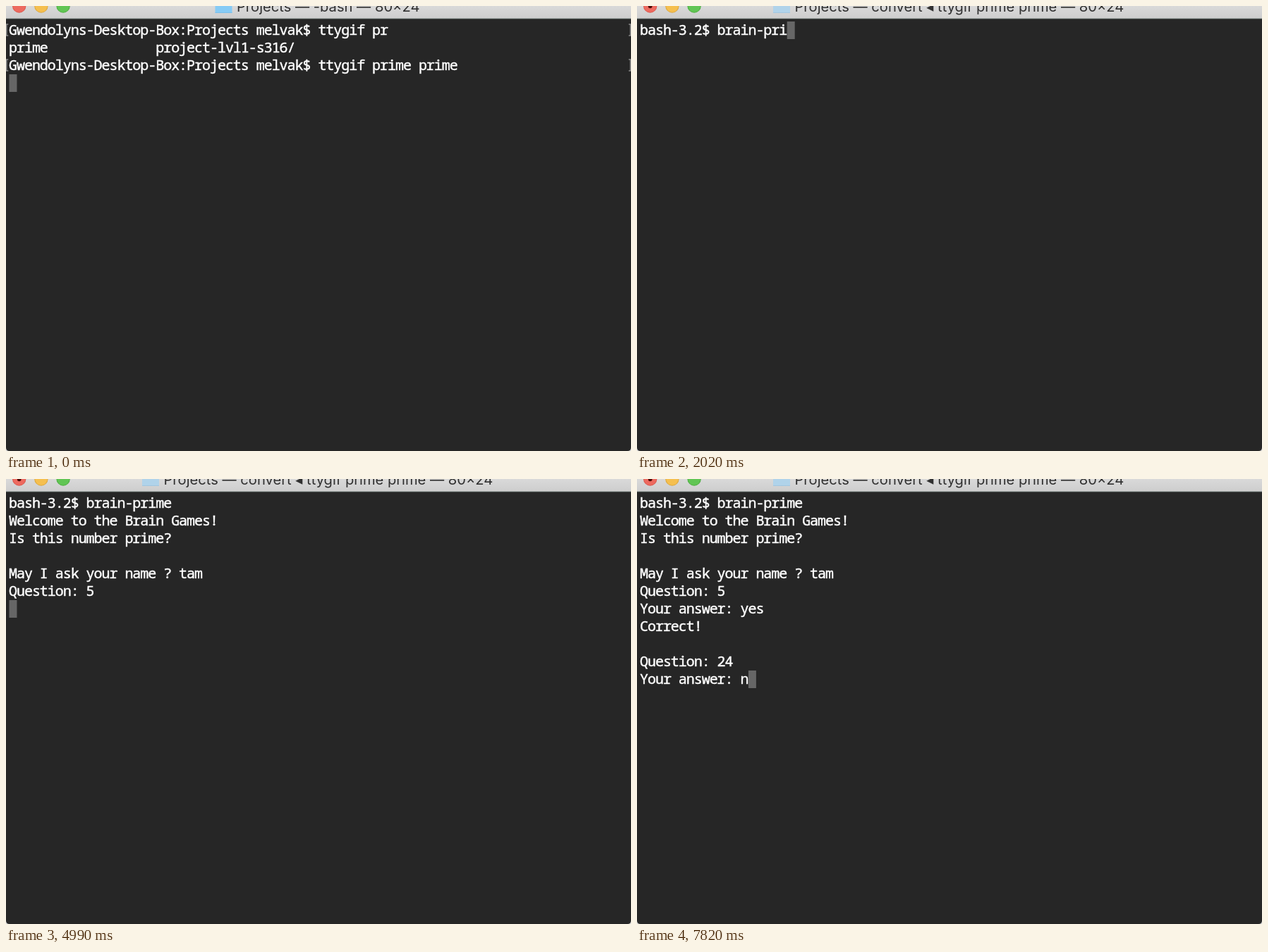
These frames come from a looping animation (886 by 632 pixels, 8 s). An HTML page with a canvas:

```html
<!DOCTYPE html>
<html lang="en">
<head>
<meta charset="utf-8">
<title>Terminal</title>
<style>
html, body { margin: 0; width: 100%; height: 100%; overflow: hidden; background: #262626; }
canvas { display: block; }
</style>
</head>
<body>
<canvas id="stage" width="886" height="632"></canvas>
<script>
const ctx = document.getElementById('stage').getContext('2d');
const W = 886, H = 632, LOOP = 8000;
const LEFT = 4.5, TOP = 22, COL = 10.96, ROW = 25;
const MONO = '400 20px "Noto Sans Mono", "DejaVu Sans Mono", monospace';
const SANS = '400 20.15px Inter, Roboto, sans-serif';
const PROMPT = 'Gwendolyns-Desktop-Box:Projects melvak$ ';
const CLEAR = 660;

const shell = PROMPT + 'ttygif pr\n' + 'prime'.padEnd(19) + 'project-lvl1-s316/\n' +
  PROMPT + 'ttygif prime prime\n';

// Output chunks in order: [time in ms, appended text]
const chunks = [
  [660, 'bash-3.2$ '], [750, 'b'], [840, 'r'], [920, 'a'], [1010, 'i'], [1300, 'n'],
  [1620, '-'], [1740, 'p'], [1870, 'r'], [2020, 'i'], [2680, 'm'], [3020, 'e'],
  [3110, '\n'], [3200, 'Welcome to the Brain Games!\nIs this number prime?\n\n'],
  [4500, 'May I ask your name ? '], [4590, 't'], [4680, 'a'], [4890, 'm'],
  [4990, '\nQuestion: 5\n'],
  [6470, 'Your answer: '], [6560, 'y'], [6650, 'e'],
  [6850, 's\nCorrect!\n\nQuestion: 24\n'],
  [7700, 'Your answer: '], [7820, 'n']
];

function rect(x, y, w, h, color) {
  ctx.fillStyle = color;
  ctx.fillRect(x, y, w, h);
}

function disc(x, y, r, color) {
  ctx.fillStyle = color;
  ctx.beginPath();
  ctx.arc(x, y, r, 0, Math.PI * 2);
  ctx.fill();
}

function titleBar(busy) {
  const bar = ctx.createLinearGradient(0, 0, 0, 17);
  bar.addColorStop(0, '#d9d9d9');
  bar.addColorStop(1, '#cecece');
  rect(0, 0, W, 17, bar);
  rect(0, 17, W, 1, '#a5aaa8');
  rect(0, 18, W, 1, '#454a48');

  const lights = [['#ed6a5f', '#d9594e'], ['#f5bf4f', '#dba63c'], ['#61c554', '#4fae43']];
  lights.forEach(([fill, edge], i) => {
    disc(18.7 + i * 31.2, 0, 9.7, edge);
    disc(18.7 + i * 31.2, 0, 8.8, fill);
  });
  if (busy) disc(18.7, 0.5, 2.8, '#4a0a06');

  const x = busy ? 193 : 296.5;
  rect(x, 0, 24, 10, busy ? '#b0d3ea' : '#86cbf5');
  rect(x, 9, 24, 1, busy ? '#a2c6df' : '#79bfea');
  const name = busy ? 'convert ◂ ttygif prime prime' : '-bash';
  ctx.font = SANS;
  ctx.letterSpacing = '0px';
  ctx.fillStyle = '#303030';
  ctx.fillText(`Projects — ${name} — 80×24`, x + 30.5, 8);
}

function bracket(x, y, dir) {
  ctx.strokeStyle = '#8c8c8c';
  ctx.lineWidth = 1.5;
  ctx.beginPath();
  ctx.moveTo(x + dir * 2.5, y);
  ctx.lineTo(x, y);
  ctx.lineTo(x, y + 16);
  ctx.lineTo(x + dir * 2.5, y + 16);
  ctx.stroke();
}

function terminal(content) {
  const lines = content.split('\n');
  const row = lines.length - 1;
  rect(LEFT + lines[row].length * COL, TOP + row * ROW, COL, ROW, '#666');

  ctx.font = MONO;
  ctx.letterSpacing = '0px';
  ctx.letterSpacing = COL - ctx.measureText('m').width + 'px';
  ctx.fillStyle = ctx.strokeStyle = '#fff';
  ctx.lineWidth = 0.45;
  lines.forEach((line, i) => {
    const y = TOP + 19 + i * ROW;
    ctx.fillText(line, LEFT - 0.5, y);
    ctx.strokeText(line, LEFT - 0.5, y);
  });
}

function corners() {
  const r = 5;
  ctx.fillStyle = '#d8d8d8';
  for (const [x, dir] of [[0, 1], [W, -1]]) {
    ctx.beginPath();
    ctx.moveTo(x, H - r);
    ctx.quadraticCurveTo(x, H, x + dir * r, H);
    ctx.lineTo(x, H);
    ctx.fill();
  }
}

function draw(t) {
  const busy = t >= CLEAR;
  rect(0, 0, W, H, '#262626');
  titleBar(busy);
  if (busy) {
    terminal(chunks.filter(c => c[0] <= t).map(c => c[1]).join(''));
  } else {
    terminal(shell);
    for (const row of [0, 2]) {
      bracket(0.75, TOP + 4 + row * ROW, 1);
      bracket(W - 0.75, TOP + 4 + row * ROW, -1);
    }
  }
  corners();
}

const start = performance.now();
function tick() {
  draw((performance.now() - start) % LOOP);
  requestAnimationFrame(tick);
}
tick();
</script>
</body>
</html>
```
